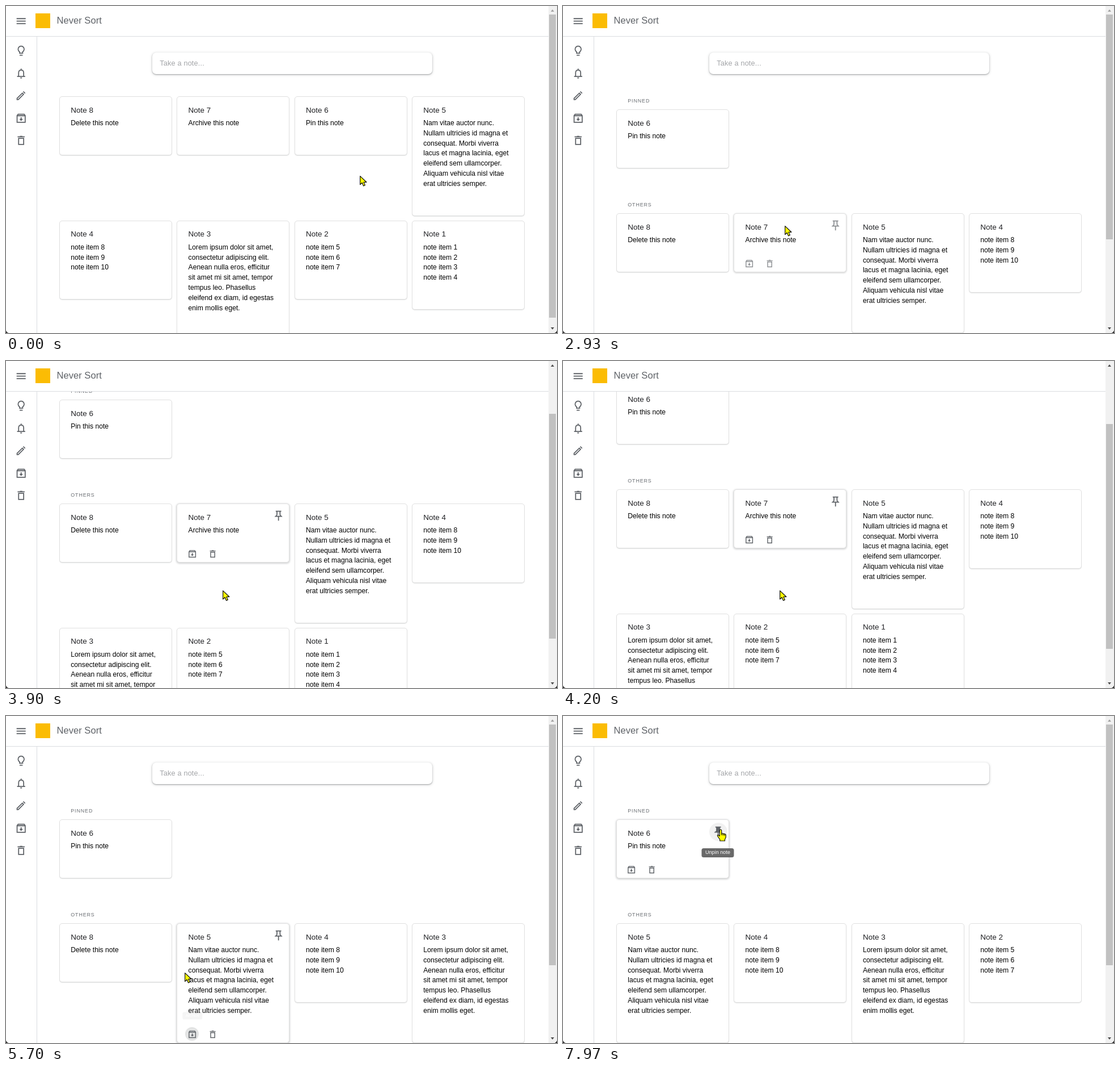
Write an HTML page that moves like this. It is 972 by 576 pixels and loops after 8000 ms.

```html
<!DOCTYPE html>
<html lang="en">
<head>
<meta charset="utf-8">
<title>Notes</title>
<style>
  html, body { margin: 0; width: 100%; height: 100%; overflow: hidden; background: #222; }
  body { font-family: "Liberation Sans", Arial, sans-serif; }
  div, svg { position: absolute; box-sizing: border-box; white-space: nowrap; }
  #stage { width: 972px; height: 576px; overflow: hidden; background: #fff; border-radius: 0 0 6px 6px; }
  #page { left: 0; top: 0; width: 957px; height: 900px; }
  #header { width: 957px; height: 54px; background: #fff; border-bottom: 1px solid #dadce0; }
  #logo { left: 52px; top: 13px; width: 26px; height: 26px; background: #fbbc04; }
  #brand { left: 89.5px; top: 13px; font-size: 16.6px; line-height: 25px; color: #5f6368; }
  #side { top: 54px; width: 55px; height: 522px; background: #fff; border-right: 1px solid #dadce0; }
  .icon { fill: none; stroke: #5f6368; stroke-width: 2; overflow: visible; }
  #entry { left: 257.5px; top: 81.5px; width: 494.5px; height: 38px; border-radius: 7px; background: #fff;
    box-shadow: 0 1px 2px rgba(60,64,67,.4), 0 1px 4px 1px rgba(60,64,67,.15);
    padding-left: 13.8px; font-size: 12.8px; letter-spacing: .12px; line-height: 37.4px; color: #a3a5a8; }
  .label { left: 114.3px; font-size: 8.9px; letter-spacing: .9px; line-height: 14px; color: #6a6e73; }
  .card { width: 199px; border: 1px solid #e0e0e0; border-radius: 5px; background: #fff; }
  .title { left: 19.3px; top: 11.6px; font-size: 13.5px; line-height: 24px; color: #202124; }
  .text { left: 19.3px; top: 38px; font-size: 12.15px; line-height: 17.83px; color: #000; white-space: pre; }
  .tools { inset: -1px; }
  .button { width: 0; height: 0; }
  .spot { border-radius: 50%; background: #3c4043; }
  .tip { height: 16px; padding: 0 6.5px; border-radius: 3.5px; background: rgba(97,97,97,.95);
    color: #fff; font-size: 9.1px; line-height: 15.5px; }
  #bar { left: 957px; width: 15px; height: 576px; background: #f1f1f1; }
  #thumb { left: 1px; width: 12px; background: #c1c1c1; }
  .arrow { left: 3.5px; border: 3.5px solid transparent; }
  #up { top: 2.5px; border-bottom: 4px solid; }
  #down { top: 566px; border-top: 4px solid #505050; }
  #cursor { width: 1px; height: 1px; overflow: visible; }
  #cursor path { stroke: #111; stroke-width: 1.2; stroke-linejoin: round; }
</style>
</head>
<body>
<div id="stage">
  <div id="page">
    <div id="entry">Take a note...</div>
    <div class="label" id="pinnedLabel" style="top:160px">PINNED</div>
    <div class="label" id="othersLabel" style="top:343px">OTHERS</div>
  </div>
  <div id="side"></div>
  <div id="header">
    <div id="logo"></div>
    <div id="brand">Never Sort</div>
  </div>
  <div id="bar">
    <div id="thumb"></div>
    <div class="arrow" id="up"></div>
    <div class="arrow" id="down"></div>
  </div>
  <svg id="cursor">
    <path id="pointer" fill="#ff0" d="M.7 .6v15l3.5-3.3 2.4 5.6 2.8-1.2-2.4-5.4h4.9z"/>
    <g id="hand">
      <path fill="#ff0" d="M-1.7 .7a1.7 1.7 0 0 1 3.4 0V5.5l6 1.3q1.6.4 1.6 2v4l-1.8 3.6V19H-1.2V16.5L-5.4 10.5q-.6-1.8 1-2l2.7 2z"/>
      <path fill="none" d="M1.7 5.5v3.5M4.4 6.5v3M7 7v3"/>
    </g>
  </svg>
</div>
<script>
const LOOP = 8000, PIN = 2000, ARCHIVE = 5570, REMOVE = 6830;
const $ = id => document.getElementById(id);
const clamp = v => Math.max(0, Math.min(1, v));

const shapes = {
  menu: 'M3 7h18M3 12h18M3 17h18',
  bulb: 'M9 17h6v-2.8a6 6 0 1 0-6 0zM9 21h6',
  bell: 'M7 17v-6q0-5.5 5-5.5t5 5.5v6M4 18h16M12 2.5v3M10.3 21h3.4',
  pencil: 'M4 20v-2.4L14.4 7.2l2.4 2.4L6.4 20zM16.2 4.2l3.6 3.6',
  archive: 'M4 7v13h16V7zM4 7l2-3h12l2 3M12 10v5M9.5 13.5l2.5 2.5 2.5-2.5',
  trash: 'M7 8v12h10V8zM5 5h14M9.5 4h5',
  pin: 'M6.5 3h11M9 3v6q0 2.5-2 4h10q-2-1.5-2-4V3M5 13h14M12 13v8.5'
};

function add(parent, className, text = '') {
  const el = document.createElement('div');
  el.className = className;
  el.textContent = text;
  parent.append(el);
  return el;
}

function icon(parent, name, x, y, size) {
  parent.insertAdjacentHTML('beforeend',
    `<svg class="icon" viewBox="0 0 24 24" width="${size}" height="${size}"
      style="left:${x - size / 2}px;top:${y - size / 2}px"><path d="${shapes[name]}"/></svg>`);
  return parent.lastElementChild;
}

icon($('header'), 'menu', 26.5, 26.5, 21.4);
['bulb', 'bell', 'pencil', 'archive', 'trash'].forEach((name, i) =>
  icon($('side'), name, 26.5, 25 + i * 39.5, 21.4));

const items = (from, to) =>
  Array.from({ length: to - from + 1 }, (_, i) => 'note item ' + (from + i));
const notes = {
  8: ['Delete this note'],
  7: ['Archive this note'],
  6: ['Pin this note'],
  5: ['Nam vitae auctor nunc.', 'Nullam ultricies id magna et', 'consequat. Morbi viverra',
      'lacus et magna lacinia, eget', 'eleifend sem ullamcorper.', 'Aliquam vehicula nisl vitae',
      'erat ultricies semper.'],
  4: items(8, 10),
  3: ['Lorem ipsum dolor sit amet,', 'consectetur adipiscing elit.', 'Aenean nulla eros, efficitur',
      'sit amet mi sit amet, tempor', 'tempus leo. Phasellus', 'eleifend ex diam, id egestas',
      'enim mollis eget.'],
  2: items(5, 7),
  1: items(1, 4)
};

function makeButton(tools, name, x, y, radius, size) {
  const el = add(tools, 'button');
  el.style.cssText = `left:${x}px;top:${y}px`;
  const spot = add(el, 'spot');
  spot.style.cssText = `left:${-radius}px;top:${-radius}px;width:${2 * radius}px;height:${2 * radius}px`;
  return { spot, svg: icon(el, name, 0, 0, size), strength: name === 'pin' ? .07 : .14 };
}

const cards = {};
for (const id in notes) {
  const height = 86.1 + 17.82 * notes[id].length;
  const el = add($('page'), 'card');
  el.style.height = height + 'px';
  add(el, 'title', 'Note ' + id);
  add(el, 'text', notes[id].join('\n'));
  const tools = add(el, 'tools');
  cards[id] = { el, height, tools, buttons: {
    pin: makeButton(tools, 'pin', 179.5, 21.5, 16, 21.4),
    archive: makeButton(tools, 'archive', 27, height - 15.5, 12, 17.3),
    trash: makeButton(tools, 'trash', 63, height - 15.5, 12, 17.3)
  } };
}

// card, on, off
const hovers = [
  [6, 140, PIN], [7, 2860, ARCHIVE], [5, ARCHIVE, 5780],
  [8, 5780, REMOVE], [5, REMOVE, 7320], [6, 7430, LOOP]
];
// card, button, on, off, fade-in
const spots = [
  [6, 'pin', 280, PIN, 100], [7, 'archive', 4980, ARCHIVE, 100], [5, 'archive', ARCHIVE, 5760, 1],
  [8, 'trash', 6090, REMOVE, 100], [5, 'trash', REMOVE, 6960, 1], [6, 'pin', 7540, LOOP, 100]
];
// text, centre x, centre y, centre y while closing, on, off
const tips = [
  ['Pin note', 688, 218, 218, 500, PIN],
  ['Archive', 328.5, 491, 527.5, 5200, ARCHIVE],
  ['Delete', 157.5, 491, 527.5, 6140, REMOVE],
  ['Unpin note', 273, 240.5, 240.5, 7800, LOOP]
].map(([text, x, y, closeY, on, off]) => ({ el: add($('stage'), 'tip', text), x, y, closeY, on, off }));
$('stage').append($('cursor'));

const cursorPath = [
  [30, 624, 299], [330, 686, 192], [2100, 686, 192], [2670, 430, 313], [3030, 382, 404],
  [4600, 382, 404], [5050, 327, 452], [5600, 327, 452], [5700, 315, 452], [5830, 270, 454],
  [6150, 156, 447], [7140, 156, 447], [7600, 278, 201]
];
const scrollPath = [
  [3300, 0], [3400, 30], [3530, 73], [3640, 87], [3800, 91], [3900, 114], [4090, 178],
  [4130, 178], [4300, 85], [4430, 14], [4560, 0]
];

function along(path, t, ease = k => k) {
  const next = path.findIndex(p => p[0] > t);
  if (next === 0) return path[0].slice(1);
  if (next < 0) return path[path.length - 1].slice(1);
  const a = path[next - 1], b = path[next], k = ease((t - a[0]) / (b[0] - a[0]));
  return a.slice(1).map((v, i) => v + (b[i + 1] - v) * k);
}

function placeRows(ids, top) {
  for (let i = 0; i < ids.length; i += 4) {
    const row = ids.slice(i, i + 4);
    row.forEach((id, column) => {
      const style = cards[id].el.style;
      style.display = '';
      style.left = 94 + 207.3 * column + 'px';
      style.top = top + 'px';
    });
    top += Math.max(...row.map(id => cards[id].height)) + 8;
  }
  return top - 8;
}

function layout(t) {
  const pinned = t >= PIN;
  const others = [8, 7, 6, 5, 4, 3, 2, 1].filter(id =>
    !(id === 6 && pinned) && !(id === 7 && t >= ARCHIVE) && !(id === 8 && t >= REMOVE));
  for (const id in cards) cards[id].el.style.display = 'none';
  $('pinnedLabel').hidden = $('othersLabel').hidden = !pinned;
  if (pinned) placeRows([6], 182);
  cards[6].buttons.pin.svg.style.fill = pinned ? '#5f6368' : 'none';
  return placeRows(others, pinned ? 365 : 159) + 1;
}

function drawHover(t) {
  for (const id in cards) {
    const { el, tools, buttons } = cards[id];
    const hover = hovers.find(([card, on, off]) => card == id && t >= on && t < off);
    const level = hover ? clamp((t - hover[1]) / 100) : 0;
    tools.style.opacity = level;
    el.style.boxShadow = `0 1px ${1 + 2 * level}px ${level}px rgba(60,64,67,${.14 + .08 * level})`;
    for (const name in buttons) buttons[name].spot.style.opacity = 0;
  }
  for (const [id, name, on, off, fadeIn] of spots) {
    if (t < on || t > off + 80) continue;
    const { spot, strength } = cards[id].buttons[name];
    spot.style.opacity = strength * clamp((t - on) / fadeIn) * clamp((off + 80 - t) / 80);
  }
}

function drawTips(t) {
  for (const { el, x, y, closeY, on, off } of tips) {
    const level = clamp((t - on) / 170) * clamp((off + 140 - t) / 140);
    el.style.left = x + 'px';
    el.style.top = (t < off ? y : closeY) - 8 + 'px';
    el.style.opacity = level;
    el.style.transform = `translateX(-50%) scale(${.8 + .2 * level})`;
  }
}

function draw() {
  const t = performance.now() % LOOP;
  const total = layout(t);
  const scroll = Math.round(along(scrollPath, t)[0]);
  $('page').style.top = -scroll + 'px';
  $('thumb').style.top = 15 + scroll * 547 / total + 'px';
  $('thumb').style.height = 547 * 576 / total + 'px';
  $('up').style.borderBottomColor = scroll ? '#505050' : '#a3a3a3';
  drawHover(t);
  drawTips(t);

  const [x, y] = along(cursorPath, t, k => k * k * (3 - 2 * k));
  $('cursor').style.left = x + 'px';
  $('cursor').style.top = y + 'px';
  const onButton = (t > 290 && t < 2130) || (t > 4980 && t < 5620) ||
    (t > 6090 && t < REMOVE) || t > 7540;
  $('hand').style.display = onButton ? '' : 'none';
  $('pointer').style.display = onButton ? 'none' : '';
  requestAnimationFrame(draw);
}
draw();
</script>
</body>
</html>
```
